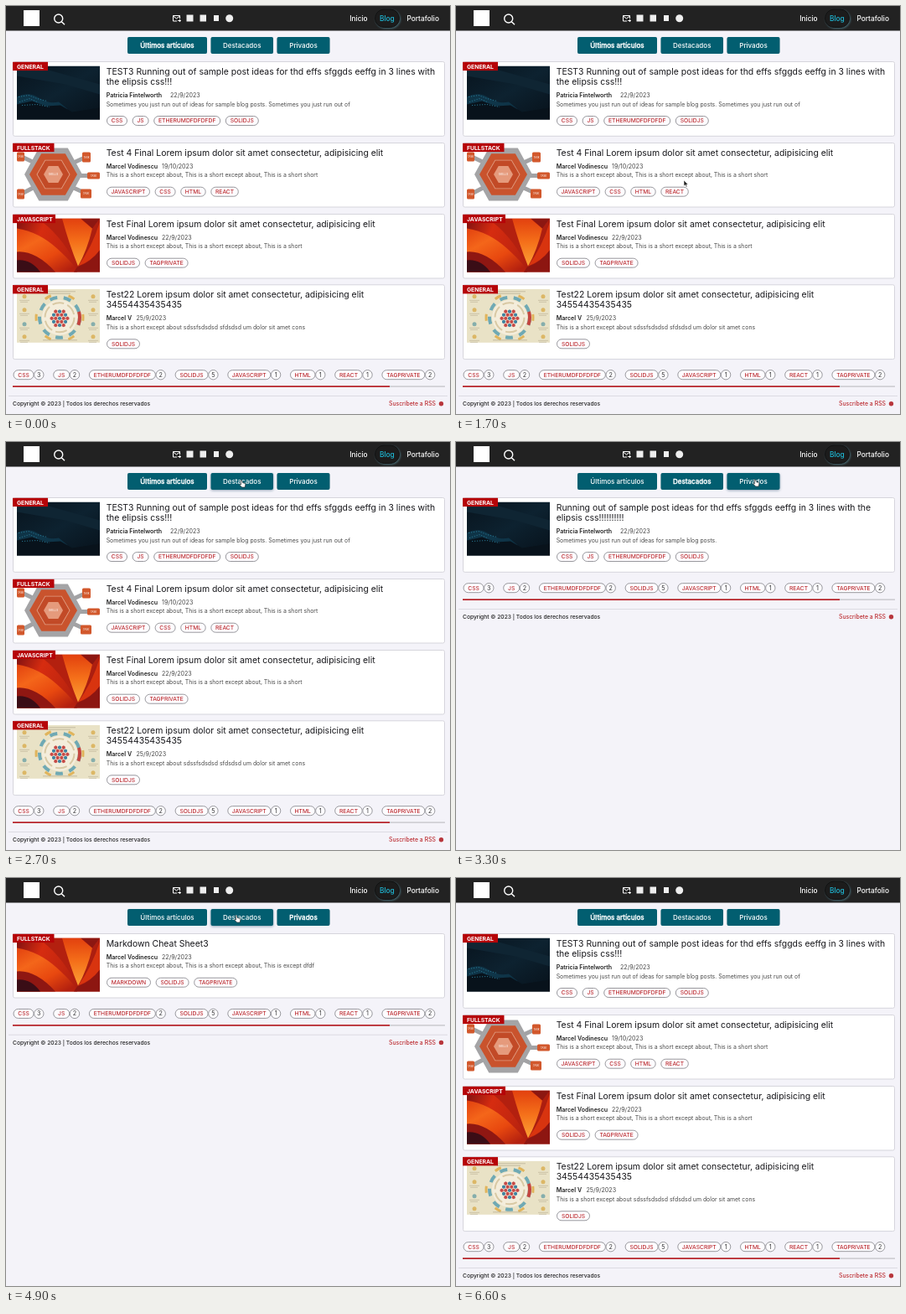
Write an HTML page that moves like this. It is 530 by 487 pixels and loops after 7200 ms.

```html
<!DOCTYPE html>
<html lang="es">
<head>
<meta charset="utf-8">
<title>Blog</title>
<style>
html, body { margin: 0; width: 100%; height: 100%; overflow: hidden; background: #f4f3f9; }
svg { display: block; font-family: Inter, sans-serif; }
.title { font-size: 10.43px; fill: #18181c; }
.author { font-size: 7.1px; font-weight: 600; fill: #222; }
.date { font-size: 7.1px; fill: #444; }
.small { font-size: 6.92px; fill: #484848; }
.tag { font-size: 6.75px; fill: #b30c10; text-anchor: middle; }
.count { font-size: 7.2px; fill: #333; text-anchor: middle; }
.label { font-size: 6.8px; font-weight: 700; fill: #fff; }
.pill { fill: #fdfcff; stroke: #98989d; }
.nav { font-size: 8.35px; font-weight: 500; fill: #fff; }
.foot { font-size: 6.7px; font-weight: 500; fill: #222; }
.btn text { font-size: 8px; font-weight: 500; fill: #fff; stroke: #fff; stroke-width: 0; text-anchor: middle; }
.btn.active text { stroke-width: .35px; }
.btn rect { fill: #025e70; filter: drop-shadow(0 .5px .5px #0003); }
.btn.hover rect { filter: drop-shadow(.5px 1.5px 1.5px #0356); }
</style>
</head>
<body>
<svg id="stage" width="530" height="487" viewBox="0 0 530 487"></svg>
<script>
const LOOP = 7200;
const stage = document.getElementById('stage');
const text = (x, y, cls, s, extra = '') => `<text x="${x}" y="${y}" class="${cls}" ${extra}>${s}</text>`;
const rect = (x, y, w, h, fill, extra = '') => `<rect x="${x}" y="${y}" width="${w}" height="${h}" fill="${fill}" ${extra}/>`;
const path = (d, fill, extra = '') => `<path d="${d}" fill="${fill}" ${extra}/>`;
const circle = (x, y, r, fill, extra = '') => `<circle cx="${x}" cy="${y}" r="${r}" fill="${fill}" ${extra}/>`;
const hex = (x, y, r, fill, turn = 0, squash = 1) => `<polygon fill="${fill}" points="${
  [0, 1, 2, 3, 4, 5].map(i => {
    const a = i * Math.PI / 3 + turn;
    return (x + r * Math.cos(a)).toFixed(1) + ',' + (y + r * squash * Math.sin(a)).toFixed(1);
  }).join(' ')}"/>`;
const gradient = (id, coords, colors) => `<linearGradient id="${id}" ${coords}>${
  colors.map((c, i) => `<stop offset="${i / (colors.length - 1)}" stop-color="${c}"/>`).join('')}</linearGradient>`;

// Pictures, each 99 x 64
function sea() {
  return rect(0, 0, 99, 64, 'url(#night)') +
    path('M20 0L99 22V34L58 22L0 12V0Z', '#0f2533') +
    path('M0 37Q14 30 26 38T50 43L61 52L38 50L20 55L0 51Z', '#12445b', 'opacity=".6"') +
    path('M0 46L18 42L35 48L52 47L66 55L99 50V64H0Z', '#08121b') +
    path('M2 37L14 35L24 39L36 42M3 43L15 39L24 43M6 47L24 46L39 49', 'none', 'stroke="#2a7d99" stroke-width=".9" stroke-dasharray="1.2 1.8"');
}
function hexagon() {
  const boxes = [[0, 6, 9, 11], [0, 50, 9, 12], [78, 6, 10, 12], [84, 30, 15, 8], [76, 50, 13, 11]];
  return rect(0, 0, 99, 64, '#fff') +
    path('M5 11L24 20M5 56L24 46M82 12L62 21M91 34H70M82 55L62 46', 'none', 'stroke="#a2a2a4" stroke-width="5"') +
    hex(43.5, 32.5, 34.5, '#a4a4a6', 0, 1.05) + hex(43.5, 32.5, 28.5, '#c9532d') +
    hex(43.5, 32.5, 20, '#e2a085') + hex(43.5, 32.5, 19, '#c24a27') + hex(43.5, 32.5, 11.5, '#e59a7c') +
    text(43.5, 33.7, '', 'SKILLS', 'font-size="3.4" text-anchor="middle" fill="#fff"') +
    boxes.map(([x, y, w, h]) => rect(x, y, w, h, '#d2582c', 'rx="1.5"') +
      text(x + w / 2, y + h / 2 + 1, '', 'TASK', 'font-size="2.8" text-anchor="middle" fill="#fff"')).join('');
}
function flame() {
  return rect(0, 0, 99, 64, 'url(#fire)') +
    path('M0 12Q26 16 48 36T72 64H0Z', 'url(#lobe)') +
    path('M0 40Q22 38 46 64H0Z', '#8f1712') +
    path('M0 50Q16 48 28 64H0Z', '#3a0d16') +
    path('M24 0Q50 16 72 56Q64 24 54 0Z', '#b3200f') +
    path('M54 0Q62 30 73 57Q84 38 90 12Q80 4 76 0Z', 'url(#petal)') +
    path('M76 0Q86 8 90 12L99 0Z', '#8c1711') +
    path('M99 4Q90 34 73 57Q88 52 99 38Z', '#d8340f') +
    path('M99 38Q88 53 72 58L68 64H99Z', '#8d1611');
}
function chart() {
  let s = rect(0, 0, 99, 64, '#e9e2c6');
  const arc = (r, color, dash, shift, w = 4) => circle(51, 34, r, 'none',
    `stroke="${color}" stroke-width="${w}" stroke-dasharray="${dash}" stroke-dashoffset="${shift}"`);
  s += circle(51, 34, 21, '#f4eddb') +
    arc(28, '#e0b45c', '8 21.3', 4, 3) + arc(24, '#6fa9b4', '9 7.75', 0) +
    arc(24, '#c4453f', '17 133.8', 8) + arc(17.5, '#d9c9a4', '14 4.3', 0, 2);
  for (let q = -2; q <= 2; q++)
    for (let r = -2; r <= 2; r++)
      if (Math.abs(q + r) <= 2)
        s += hex(51 + 4.7 * (q + r / 2), 35 + 4.1 * r, 2.3, (q - r + 6) % 3 ? '#c64a47' : '#3f83a0', Math.PI / 6);
  for (const x of [9, 91])
    for (const y of [9, 25, 42, 57]) {
      s += circle(x, y, 2.5, y % 2 ? '#dcb766' : '#86aeac');
      s += path(`M${x - 6} ${y + 4.5}h12M${x - 5} ${y + 6.5}h9`, 'none', 'stroke="#b5ab90" stroke-width=".6"');
    }
  return s + path('M30 3H70M36 5.5H64M31 61H72', 'none', 'stroke="#b5ab90" stroke-width=".7"');
}

const tagWidth = { CSS: 24, JS: 19, ETHERUMDFDFDFDF: 79, SOLIDJS: 39, JAVASCRIPT: 51, HTML: 29.5, REACT: 32.5, TAGPRIVATE: 51, MARKDOWN: 52 };
const pill = (x, y, name) =>
  rect(x, y - 5.5, tagWidth[name], 11, '', 'rx="5.5" class="pill"') + text(x + tagWidth[name] / 2, y + 2.4, 'tag', name);

function card(top, kind, picture, lines, author, date, excerpt, tags) {
  const shift = lines.length > 1 ? 12.3 : 0;
  const labelWidth = { GENERAL: 42, FULLSTACK: 49.5, JAVASCRIPT: 51 }[kind];
  const dateX = { 20: 196, 16: 186, 8: 155.5 }[author.length];
  let x = 120.5;
  return rect(8.5, top, 515, 76.5 + shift, '#fff', 'rx="2" stroke="#d6d5dc"') +
    `<svg x="13" y="${top + 5}" width="99" height="64.5">${picture()}</svg>` +
    rect(8, top + .3, labelWidth, 10.3, '#b60408') + text(13, top + 8, 'label', kind) +
    lines.map((s, i) => text(119.7, top + 15.2 + 12.3 * i, 'title', s)).join('') +
    text(119.7, top + 30 + shift, 'author', author) + text(dateX, top + 30 + shift, 'date', date) +
    text(119.7, top + 40.8 + shift, 'small', excerpt) +
    tags.split(' ').map(name => {
      const s = pill(x, top + 58.2 + shift, name);
      x += tagWidth[name] + 6.6;
      return s;
    }).join('');
}

const short = 'This is a short except about, ';
const sometimes = 'Sometimes you just run out of';
const woman = 'Patricia Fintelworth', man = 'Marcel Vodinescu';
const views = [
  card(66.5, 'GENERAL', sea, ['TEST3 Running out of sample post ideas for thd effs sfggds eeffg in 3 lines with', 'the elipsis css!!!'],
    woman, '22/9/2023', sometimes + ' ideas for sample blog posts. ' + sometimes, 'CSS JS ETHERUMDFDFDFDF SOLIDJS') +
  card(163.5, 'FULLSTACK', hexagon, ['Test 4 Final Lorem ipsum dolor sit amet consectetur, adipisicing elit'],
    man, '19/10/2023', short + short + 'This is a short short', 'JAVASCRIPT CSS HTML REACT') +
  card(248.5, 'JAVASCRIPT', flame, ['Test Final Lorem ipsum dolor sit amet consectetur, adipisicing elit'],
    man, '22/9/2023', short + short + 'This is a short', 'SOLIDJS TAGPRIVATE') +
  card(332.8, 'GENERAL', chart, ['Test22 Lorem ipsum dolor sit amet consectetur, adipisicing elit', '34554435435435'],
    'Marcel V', '25/9/2023', 'This is a short except about sdssfsdsdsd sfdsdsd um dolor sit amet cons', 'SOLIDJS'),
  card(66.5, 'GENERAL', sea, ['Running out of sample post ideas for thd effs sfggds eeffg in 3 lines with the', 'elipsis css!!!!!!!!!!'],
    woman, '22/9/2023', sometimes + ' ideas for sample blog posts.', 'CSS JS ETHERUMDFDFDFDF SOLIDJS'),
  card(66.5, 'FULLSTACK', flame, ['Markdown Cheat Sheet3'],
    man, '22/9/2023', short + short + 'This is except dfdf', 'MARKDOWN SOLIDJS TAGPRIVATE')
];
const footerShift = [0, -266, -278.3];

function header() {
  return rect(0, 0, 530, 29.5, '#222') + rect(21, 5, 19, 19, '#fff') +
    circle(62.7, 15, 5, 'none', 'stroke="#fff" stroke-width="1.4"') +
    path('M66.3 18.7L70 22.3', 'none', 'stroke="#fff" stroke-width="1.5"') +
    path('M207.5 15V11.5H199.5V18H204M199.5 12L203.5 15L207.5 12M205 17.5H208.5M207 16L208.5 17.5L207 19', 'none', 'stroke="#fff"') +
    rect(215.5, 10.5, 8, 8, '#eee') + rect(231.5, 10.5, 7.5, 8, '#eee') +
    rect(248, 11, 6, 7, '#eee') + circle(266.7, 14.7, 4.5, '#eee') +
    text(410.3, 17.7, 'nav', 'Inicio') +
    rect(440.5, 4, 29, 21.5, '#1c1c1c', 'rx="10.8" stroke="#111" style="filter:drop-shadow(1px 1.5px 1px #456872)"') +
    text(446, 17.7, 'nav', 'Blog', 'style="fill:#1fb9d6"') + text(478.4, 17.7, 'nav', 'Portafolio');
}
const buttons = [[145, 95, 'Últimos artículos'], [244.5, 74.5, 'Destacados'], [323.5, 63, 'Privados']];

function footer() {
  const counts = { CSS: 3, JS: 2, ETHERUMDFDFDFDF: 2, SOLIDJS: 5, JAVASCRIPT: 1, HTML: 1, REACT: 1, TAGPRIVATE: 2 };
  let x = 9, s = '';
  for (const name in counts) {
    const cx = x + tagWidth[name] + 6.3;
    s += pill(x, 440.2, name) + circle(cx, 440.2, 5.7, '', 'class="pill"') + text(cx, 442.8, 'count', counts[name]);
    x += tagWidth[name] + 23.7;
  }
  return s + rect(8, 453.4, 516, 1.5, '#cbcad0') + rect(8, 453.4, 450, 1.5, '#b60c12') + rect(3, 465, 524, 1, '#dcdbe2') +
    text(8, 477.2, 'foot', 'Copyright © 2023 | Todos los derechos reservados') +
    text(513, 477.2, 'small', 'Suscríbete a RSS', 'text-anchor="end" style="fill:#b30c10"') + circle(519.5, 474.7, 2.7, '#b8373d');
}

stage.innerHTML = `<defs>${
  gradient('night', 'x1="0" y1="0" x2="1" y2="1"', ['#08141e', '#0d2230', '#07111a'])}${
  gradient('fire', 'x1="0" y1="0" x2="1" y2=".3"', ['#7d1011', '#d62c10', '#c2260f', '#a51c10'])}${
  gradient('lobe', 'x1="0" y1="0" x2=".8" y2="1"', ['#e2410f', '#f4661a', '#e8480f', '#b3200f'])}${
  gradient('petal', 'x1="0" y1="0" x2="0" y2="1"', ['#e2400e', '#f5701a', '#fba236'])}</defs>` +
  rect(0, 0, 530, 487, '#f4f3f9') + header() +
  buttons.map(([x, w, s]) => `<g class="btn">${rect(x, 37, w, 20, '', 'rx="2"')}${text(x + w / 2, 50, '', s)}</g>`).join('') +
  views.map(s => `<g class="view">${s}</g>`).join('') +
  `<g id="footer">${footer()}</g><g id="cursor">` +
  path('M0 0V7L1.7 5.5L2.8 8L4 7.4L2.9 5.1H5Z', '#222', 'id="arrow" stroke="#fff" stroke-width=".5"') +
  path('M0 0Q1-.9 1.6.2L2.2 2.6L5.2 3.4Q6 3.8 5.8 5L5.2 8H1.6L-1.2 5Q-1.4 4 .7 4.7Z', '#fff', 'id="hand" stroke="#222" stroke-width=".6"') + '</g>';

// Pointer stops: time, x, y
const stops = [[1700, 272, 208], [2100, 279, 60], [2300, 281, 50], [2700, 280, 46], [3000, 282, 46], [3300, 356, 45],
  [4400, 356, 45], [4600, 322, 212], [4900, 274, 45], [5100, 262, 46], [5400, 195, 46], [5900, 195, 46], [6500, 300, 495]];
const [btnEls, viewEls] = ['.btn', '.view'].map(s => [...stage.querySelectorAll(s)]);
const el = id => document.getElementById(id);
const show = (node, on) => node.setAttribute('display', on ? 'inline' : 'none');

function pointer(t) {
  const i = stops.findIndex(s => s[0] > t);
  if (i < 1) return null;
  const [t0, x0, y0] = stops[i - 1], [t1, x1, y1] = stops[i];
  const k = (t - t0) / (t1 - t0), e = k * k * (3 - 2 * k);
  return [x0 + (x1 - x0) * e, y0 + (y1 - y0) * e];
}

function draw(now) {
  const t = Math.floor(now % LOOP / 100) * 100;
  const view = t < 3000 || t >= 5600 ? 0 : t < 4200 ? 1 : 2;
  const p = pointer(t);
  const hover = p ? buttons.findIndex(([x, w]) => p[0] >= x && p[0] <= x + w && p[1] >= 37 && p[1] <= 57) : -1;
  viewEls.forEach((v, i) => show(v, i === view));
  btnEls.forEach((b, i) => {
    b.classList.toggle('active', i === view);
    b.classList.toggle('hover', i === hover);
  });
  el('footer').setAttribute('transform', `translate(0 ${footerShift[view]})`);
  show(el('cursor'), p);
  if (p) el('cursor').setAttribute('transform', `translate(${p[0]} ${p[1]})`);
  show(el('arrow'), hover < 0);
  show(el('hand'), hover >= 0);
}

let start;
function frame(now) {
  start ??= now;
  draw(now - start);
  requestAnimationFrame(frame);
}
draw(0);
requestAnimationFrame(frame);
</script>
</body>
</html>
```
